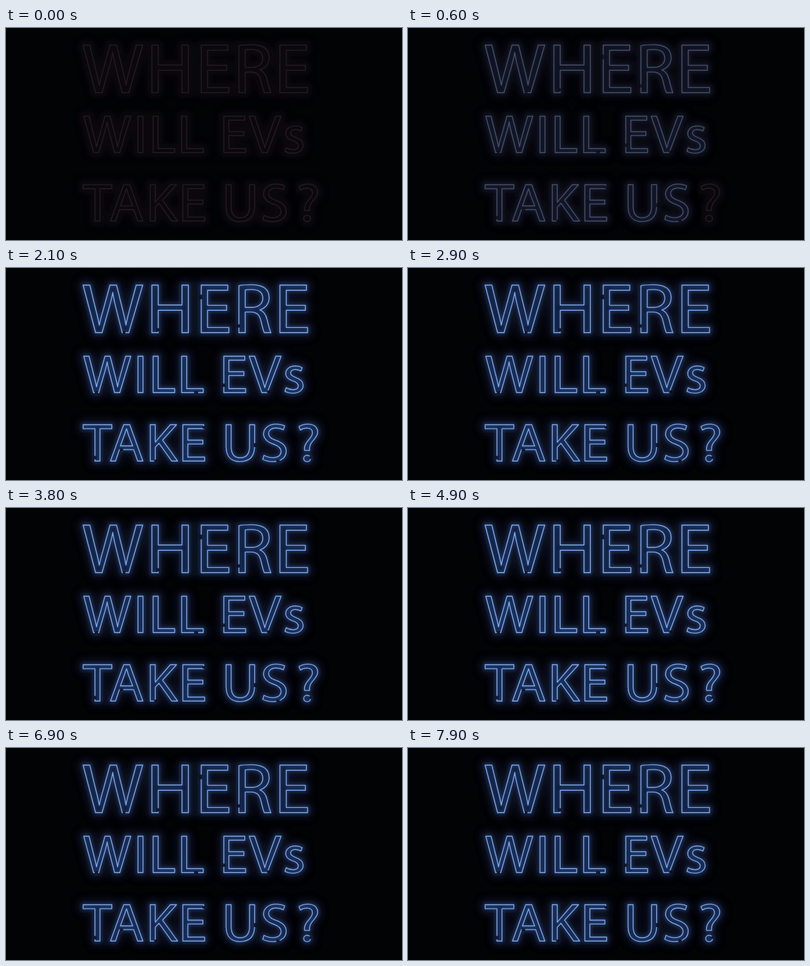
Write an HTML page that moves like this. It is 600 px wide and 322 px high and loops after 8 s.

```html
<!DOCTYPE html>
<html lang="en">
<head>
<meta charset="utf-8">
<title>Where will EVs take us?</title>
<style>
  html, body { margin: 0; width: 100%; height: 100%; overflow: hidden; background: #020305; }
  svg { display: block; width: 100vw; height: 100vh; }
  path { stroke-linejoin: round; fill-rule: evenodd; }
  .haze { stroke: #141013; stroke-width: 14; fill: #141013; opacity: .5; }
  .unlit { fill: none; stroke: #211b1f; stroke-width: 1.6; }
  .halo { stroke: #14284a; stroke-width: 20; fill: #14284a; opacity: .34; }
  .fill { fill: #0e1c38; stroke: none; opacity: .7; }
  .glow { stroke-width: 5; fill: none; opacity: .36; }
  .tube { stroke-width: 1.4; fill: none; }
</style>
</head>
<body>
<svg viewBox="0 0 600 322" role="img" aria-label="WHERE WILL EVs TAKE US?">
  <defs>
    <filter id="wide" filterUnits="userSpaceOnUse" x="0" y="0" width="600" height="322">
      <feGaussianBlur stdDeviation="6"/>
    </filter>
    <filter id="soft" filterUnits="userSpaceOnUse" x="0" y="0" width="600" height="322">
      <feGaussianBlur stdDeviation="2.6"/>
    </filter>
    <mask id="gaps" maskUnits="userSpaceOnUse" x="0" y="0" width="600" height="322">
      <rect width="600" height="322" fill="#fff"/>
    </mask>
  </defs>
</svg>
<script>
const LOOP = 8000, TRACKING = 25;
const svg = document.querySelector('svg');

function add(parent, tag, attrs = {}) {
  const el = document.createElementNS('http://www.w3.org/2000/svg', tag);
  for (const k in attrs) el.setAttribute(k, attrs[k]);
  return parent.appendChild(el);
}

// Advance width and outline, in thousandths of an em, y up from the baseline
const glyphs = {
  ' ': [212, ''],
  W: [846, 'M3,674L174,0L263,0L359,351Q399,495 410,571Q419,495 454,351L539,0L630,0L821,674' +
    'L732,674L643,334Q604,180 591,107Q581,180 544,332L462,674L372,674L282,334Q238,180 225,106' +
    'Q213,180 175,333L95,674z'],
  H: [652, 'M76,674L76,0L163,0L163,316L489,316L489,0L577,0L577,674L489,674L489,392L163,392L163,674z'],
  E: [492, 'M76,674L76,0L455,0L455,73L163,73L163,316L425,316L425,388L163,388L163,601L440,601L440,674z'],
  R: [538, 'M76,665C120,674 183,679 243,679C400,679 491,625 491,496C491,407 435,348 364,322' +
    'C416,303 447,255 463,185C485,91 501,26 515,0L425,0C414,19 399,77 380,161' +
    'C360,254 324,289 245,292L163,292L163,0L76,0z' +
    'M163,358L252,358C345,358 404,409 404,486C404,573 341,612 249,612Q190,612 163,604z'],
  I: [239, 'M76,674L76,0L163,0L163,674z'],
  L: [472, 'M76,674L76,0L451,0L451,73L163,73L163,674z'],
  V: [558, 'M1,674L221,0L315,0L556,674L464,674L350,343Q291,170 272,90Q254,170 200,342L95,674z'],
  s: [396, 'M40,23C74,3 123,-11 176,-11C291,-11 357,49 357,134C357,206 314,248 230,280' +
    'C167,304 138,322 138,362C138,398 167,428 219,428Q270,428 318,400L340,464Q290,494 221,494' +
    'C117,494 54,430 54,352C54,294 95,246 182,215C247,191 272,168 272,126C272,86 242,54 178,54Q115,54 62,89z'],
  T: [430, 'M204,0L292,0L292,600L498,600L498,674L-1,674L-1,600L204,600z'],
  A: [612, 'M20,0L107,0L175,212L424,212L494,0L584,0L355,674L250,674z' +
    'M192,280L258,475L300,600L337,474L407,280z'],
  K: [542, 'M76,674L76,0L163,0L163,257L227,331L449,0L552,0L289,388L533,674L425,674L219,420' +
    'Q190,385 163,349L163,674z'],
  U: [647, 'M75,674L75,272C75,67 180,-11 317,-11C462,-11 572,67 572,276L572,674L484,674L484,271' +
    'C484,122 420,60 320,60C230,60 163,120 163,271L163,674z'],
  S: [493, 'M42,33C78,9 149,-11 214,-11C373,-11 450,80 450,184C450,283 392,338 278,382' +
    'C185,418 144,449 144,512C144,558 179,613 271,613Q345,613 399,581L423,652Q365,685 274,685' +
    'C143,685 56,607 56,502C56,407 124,350 234,311C325,276 361,240 361,177C361,109 309,62 220,62Q130,62 64,106z'],
  '?': [406, 'M125,196C108,268 138,325 190,387C235,441 260,480 260,526C260,577 228,612 163,612' +
    'Q95,610 50,576L26,639C63,667 122,685 183,685C290,685 351,626 351,535C351,472 311,424 263,368' +
    'C219,317 203,270 209,196z' +
    'M108,48C108,125 226,125 226,48C226,-31 108,-31 108,48z']
};

// Outline of a word line from x on the given baseline
function line(text, x, base, sx, sy) {
  let d = '';
  for (const ch of text) {
    const [advance, outline] = glyphs[ch], x0 = x;
    d += outline.replace(/(-?\d+),(-?\d+)/g, (_, u, v) =>
      `${(x0 + u * sx).toFixed(2)},${(base - v * sy).toFixed(2)}`);
    x += (advance + TRACKING) * sx;
  }
  return d;
}

const SMALL = [.087, .0818];
const words = line('WHERE', 116.5, 98.2, .1104, .1072) +
  line('WILL EVs', 117.6, 189.2, ...SMALL) +
  line('TAKE US', 117, 293.2, ...SMALL);
const question = line('?', 441.7, 293.2, ...SMALL);

// Breaks in the tubes: centre x, centre y, width, height
const gaps = [
  [179, 98, 4, 4], [230, 94, 5, 5], [295, 44, 5, 7], [352, 88, 5, 5],
  [137, 189, 5, 4], [288, 189, 6, 4], [330, 178, 5, 5], [398, 188, 5, 4],
  [135, 288, 5, 5], [175, 276, 5, 4], [227, 293, 5, 4], [300, 242, 4, 4],
  [378, 269, 5, 6], [412, 293, 5, 4], [461, 288, 3, 4]
];
for (const [x, y, w, h] of gaps) {
  add(svg.querySelector('mask'), 'rect', { x: x - w / 2, y: y - h / 2, width: w, height: h });
}

const BLUE = '#83aaea', PALE = '#92a4cb';

function sign(d) {
  add(svg, 'path', { d, class: 'haze', filter: 'url(#wide)' });
  add(svg, 'path', { d, class: 'unlit' });

  const on = add(svg, 'g', { stroke: BLUE });
  add(on, 'path', { d, class: 'halo', filter: 'url(#wide)' });
  add(on, 'path', { d, class: 'fill' });
  const lit = add(on, 'g', { mask: 'url(#gaps)' });
  add(lit, 'path', { d, class: 'glow', filter: 'url(#soft)', style: 'stroke: #3f78d8' });
  add(lit, 'path', { d, class: 'tube' });
  return on;
}

// Steps: time in ms, brightness, tube colour
function play(el, steps) {
  el.animate(
    steps.map(([t, opacity, stroke]) => ({ offset: t / LOOP, opacity, stroke })),
    { duration: LOOP, iterations: Infinity, easing: 'steps(80)' }
  );
}

const hum = [
  [2100, 1, BLUE], [3000, .96, BLUE], [4800, 1, BLUE],
  [5900, 1, BLUE], [6900, .97, BLUE], [8000, .97, BLUE]
];
play(sign(words), [
  [0, 0, PALE], [300, 0, PALE], [700, .5, PALE], [1000, .9, PALE], [1400, 1, BLUE], ...hum
]);
play(sign(question), [
  [0, 0, PALE], [1000, 0, PALE], [1300, .5, PALE], [1700, 1, BLUE], ...hum
]);
</script>
</body>
</html>
```
